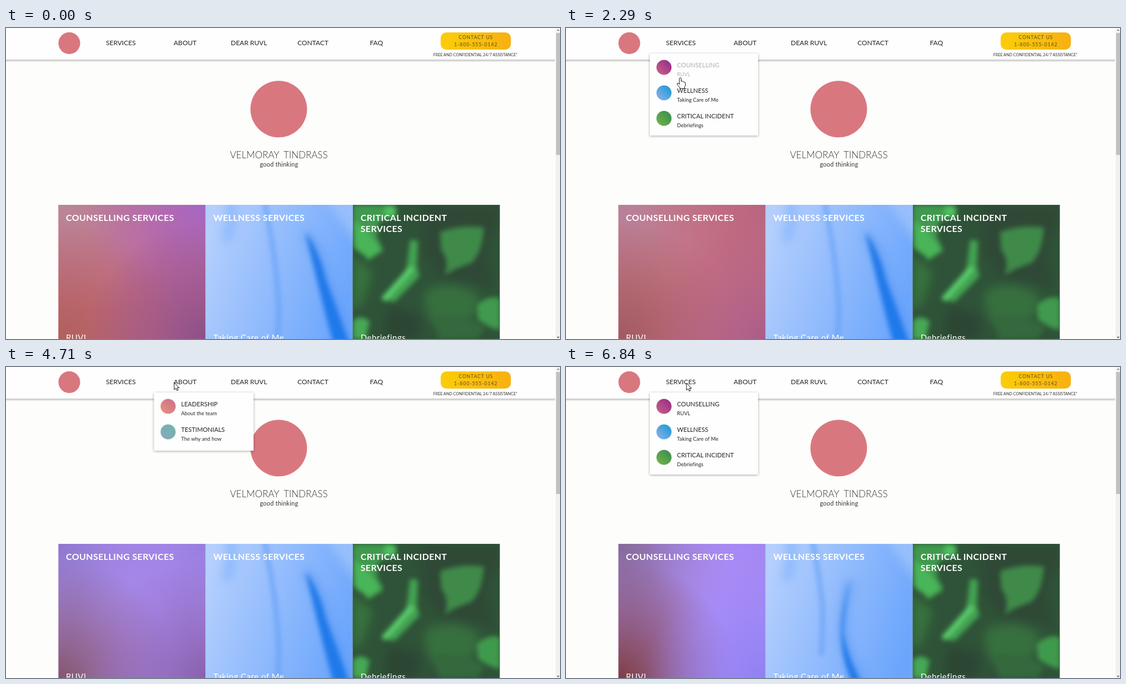
These frames come from a looping animation (998x561 px, 6890 ms). An HTML page:

```html
<!DOCTYPE html>
<html lang="en">
<head>
<meta charset="utf-8">
<title>Services page</title>
<style>
html, body { margin: 0; width: 100%; height: 100%; overflow: hidden; background: #fdfdfc; }
#stage { display: block; width: 998px; height: 561px; font-family: Lato, "Open Sans", sans-serif; }
.panel { filter: drop-shadow(0 1px 2px rgba(0,0,0,.35)); }
.soft { filter: blur(4px); }
.softer { filter: blur(9px); }
</style>
</head>
<body>
<svg id="stage" viewBox="0 0 998 561"></svg>
<script>
const LOOP = 6890;
const stage = document.getElementById('stage');
const $ = id => document.getElementById(id);

const text = (x, y, size, str, attrs = '') =>
  `<text x="${x}" y="${y}" font-size="${size}" ${attrs}>${str}</text>`;

const linear = (id, a, b, dir = 'x1="0" y1="1" x2="1" y2="0"') =>
  `<linearGradient id="${id}" ${dir}><stop stop-color="${a}"/><stop offset="1" stop-color="${b}"/></linearGradient>`;

const card = (x, body) =>
  `<svg x="${x}" y="319" width="265" height="242" viewBox="${x} 319 265 242">${body}</svg>`;

const cardText = (x, lines, sub) =>
  lines.map((s, i) => text(x, 347.7 + i * 20.5, 16, s, 'font-weight="700" letter-spacing=".4"')).join('') +
  text(x, 564, 15, sub, 'letter-spacing=".5"');

function menu(id, x, w, h, items) {
  const rows = items.map(([title, sub, fill], i) => {
    const y = 71 + i * 46;
    return `<circle cx="${x + 25.5}" cy="${y}" r="13.6" fill="url(#${fill})"/>
      <g id="${fill}Row">${text(x + 49, y + .2, 11.1, title)}${text(x + 49, y + 15.6, 9.2, sub, 'letter-spacing=".1"')}</g>`;
  }).join('');
  return `<g id="${id}"><rect class="panel" x="${x}" y="46" width="${w}" height="${h}" fill="#fefefe"/>${rows}</g>`;
}

// Card 1: four corner glows over a centre colour
const corners = [[94.5, 319], [359.5, 319], [94.5, 561], [359.5, 561]];
const glowDefs = corners.map((c, i) =>
  `<radialGradient id="glow${i}"><stop class="tone${i}"/><stop class="tone${i}" offset=".4" stop-opacity=".62"/><stop class="tone${i}" offset="1" stop-opacity="0"/></radialGradient>`).join('');
const glows = corners.map(([x, y], i) =>
  `<circle cx="${x}" cy="${y}" r="215" fill="url(#glow${i})"/>`).join('');

const leaves = `
  <rect x="624" y="319" width="266" height="242" fill="#2f5338"/>
  <g class="softer">
    <path d="M750 319H890V350L862 400 880 470 840 460 780 450 750 400Z" fill="#2f4936"/>
    <path d="M755 475Q800 450 850 480Q860 530 800 545Q750 540 755 475Z" fill="#37703f"/>
    <path d="M625 410L660 440 640 500 625 510Z" fill="#38743f"/>
    <path d="M690 500L750 520 740 561H680Z" fill="#2c4634"/>
  </g>
  <g class="soft">
    <path d="M625 319H700L704 338 672 350 668 375 680 402 652 420 638 400 625 395Z" fill="#40994e"/>
    <path d="M625 345L655 372 676 400 655 415 630 400Z" fill="#49b558"/>
    <path d="M684 319L704 324 700 342 680 338Z" fill="#4fbf60"/>
    <path d="M782 368Q820 354 861 360Q858 405 838 424Q812 432 790 446Q800 420 784 400Z" fill="#3f8a49"/>
    <path d="M728 382L742 384 740 430 745 448 700 494 676 490 712 452 722 432Z" fill="#43a352"/>
    <path d="M732 432L680 490" stroke="#5bd06d" stroke-width="10" fill="none"/>
    <path d="M848 500Q870 480 890 488V545Q868 540 850 526Z" fill="#409a4d"/>
    <path d="M625 528Q640 515 655 530L648 561H625Z" fill="#46a854"/>
    <path d="M770 520Q820 512 862 540L850 561H780Z" fill="#34683d"/>
  </g>`;

stage.innerHTML = `
<defs>
  ${linear('plum', '#cc6484', '#91288c')}
  ${linear('azure', '#93b4e6', '#1295d8')}
  ${linear('fern', '#72b944', '#398654')}
  ${linear('coral', '#f0907c', '#c4708a')}
  ${linear('teal', '#86a9c4', '#72b4a6')}
  ${linear('gold', '#fbcd08', '#f8b010', '')}
  ${linear('sky', '#b4cffd', '#6ca6fc', 'x1="0" y1=".3" x2="1" y2=".6"')}
  ${linear('shade', '#000', '#000', 'x1="0" y1="0" x2="0" y2="1"').replace('stop-color="#000"/>', 'stop-color="#000" stop-opacity=".24"/>').replace('offset="1" stop-color="#000"', 'offset="1" stop-color="#000" stop-opacity="0"')}
  ${glowDefs}
</defs>
<rect width="998" height="561" fill="#fdfdfc"/>
<rect y="57" width="989" height="5" fill="url(#shade)"/>
<rect width="989" height="57" fill="#fefefe"/>
<circle cx="114" cy="27.3" r="19.6" fill="#d9777f"/>
<circle cx="491.3" cy="146.3" r="51" fill="#d9777f"/>
<g fill="#222">
  ${[[180, 'SERVICES'], [302, 'ABOUT'], [405, 'DEAR RUVL'], [525, 'CONTACT'], [655.5, 'FAQ']]
    .map(([x, s]) => text(x, 30.8, 12, s)).join('')}
</g>
<rect x="783" y="8" width="126.5" height="31" rx="10" fill="url(#gold)"/>
<g text-anchor="middle" fill="#5a4a1c">
  ${text(846.5, 19.5, 8.5, 'CONTACT US', 'letter-spacing=".95"')}
  ${text(846.5, 33, 8.5, '1-800-555-0142', 'letter-spacing="1.05"')}
  ${text(845.5, 50.6, 7.2, 'FREE AND CONFIDENTIAL 24/7 ASSISTANCE*', 'fill="#333"')}
  ${text(491.5, 234.6, 17, 'VELMORAY TINDRASS', 'fill="#333" font-weight="300" word-spacing="4"')}
  ${text(491.8, 250.4, 11, 'good thinking', 'fill="#333" letter-spacing=".25"')}
</g>
${card(94.5, `<rect id="centre" x="94" y="319" width="266" height="242"/>${glows}`)}
${card(359.5, `
  <rect x="359" y="319" width="266" height="242" fill="url(#sky)"/>
  <g class="softer">
    <path d="M403 305Q412 340 396 385" stroke="#80b2fa" stroke-width="15" fill="none" opacity=".8"/>
    <path d="M570 300H640V400Z" fill="#a4c6fb" opacity=".7"/>
    <path id="ridge" fill="none" stroke="#4d92f4" stroke-width="16" opacity=".5"/>
  </g>
  <g class="soft">
    <path id="crease" fill="none" stroke="#5c9bf5" stroke-width="8" opacity=".65"/>
    <path id="fold" fill="#2079ea"/>
  </g>`)}
${card(624.5, leaves)}
<g fill="#fff">
  ${cardText(108, ['COUNSELLING SERVICES'], 'RUVL')}
  ${cardText(373.5, ['WELLNESS SERVICES'], 'Taking Care of Me')}
  ${cardText(638.7, ['CRITICAL INCIDENT', 'SERVICES'], 'Debriefings')}
</g>
<g fill="#222">
  ${menu('services', 151, 195, 148, [
    ['COUNSELLING', 'RUVL', 'plum'],
    ['WELLNESS', 'Taking Care of Me', 'azure'],
    ['CRITICAL INCIDENT', 'Debriefings', 'fern']])}
  ${menu('about', 266.5, 179.5, 105, [
    ['LEADERSHIP', 'About the team', 'coral'],
    ['TESTIMONIALS', 'The why and how', 'teal']])}
</g>
<g id="status">
  <path class="panel" d="M-4 552H326Q329 552 329 555V566H-4Z" fill="#fff"/>
  ${text(-4, 563, 9.2, 'https://velmoray-tindrass.example/care.html', 'fill="#555"')}
</g>
<rect x="990" width="8" height="561" fill="#f1f1f1"/>
<rect x="991" y="9" width="7" height="220" fill="#c1c1c1"/>
<path d="M992.5 5L994.7 2.5 997 5Z" fill="#777"/>
<path d="M992.5 557L994.7 559.5 997 557Z" fill="#444"/>
<g id="cursor" fill="#fff" stroke="#111" stroke-linejoin="round">
  <path id="arrow" d="M0 0V13L3 10.2 5 14.6 7.2 13.6 5.2 9.4H9Z"/>
  <path id="hand" d="M-1.7 1.5Q0-1.2 1.7 1.5V7Q3.4 5.6 4.4 7.6Q6 6.6 7 8.6Q9 8 9.2 10.5V14Q8.6 16.5 7.6 17.5V20H-1V18Q-3.6 15.6-6 11.6Q-5.4 8.8-3 11L-1.7 12.5Z"/>
</g>`;

// time, then colours: centre, top left, top right, bottom left, bottom right
const tones = [
  [0, 'cb6d8c b78798 a566c4 b0605a 8c5088'],
  [1630, 'd07280 b37a7a c06a82 a0504c b4607f'],
  [2880, 'd27a82 b687b8 b0607e a06274 a25a92'],
  [3840, 'b898fb a688ee ae90f4 8c608e 9a80f2'],
  [4710, 'b694fb 8f78cc 987ede 85566c 8860ac'],
  [5500, 'ba93ef 8f70be 9c76c0 805a84 80609a'],
  [6840, 'b695fd 866898 a286f2 7e3e42 9080f2']
].map(([t, s]) => [t, ...s.match(/\w\w/g).map(h => parseInt(h, 16))]);

const route = [
  [800, 96, 150], [1450, 188, 36], [1630, 190, 34], [1950, 203, 68], [2250, 206, 84],
  [2550, 205, 122], [2880, 204, 162], [3300, 208, 166], [3600, 212, 135], [3840, 215, 83],
  [4150, 220, 60], [4350, 240, 38], [4710, 303, 28], [5050, 310, 29], [5500, 277, 28],
  [5850, 225, 29], [6840, 217, 29]
];

const creaseFrom = [465, 310, 484, 400, 489, 470, 494, 520, 488, 570];
const creaseTo = [443, 310, 454, 360, 461, 420, 464, 450, 460, 520];
const foldFrom = [540, 370, 564, 400, 577, 455, 594, 500, 619, 570, 590, 570, 568, 490, 540, 370];
const foldTo = [512, 385, 500, 440, 500, 480, 506, 520, 533, 570, 516, 570, 478, 490, 512, 385];

const mix = (a, b, k) => a.map((v, i) => v + (b[i] - v) * k);
const clamp = v => Math.max(0, Math.min(1, v));
const within = (t, a, b) => t >= a && t < b;

function sample(keys, t) {
  let i = 0;
  while (i < keys.length - 2 && t >= keys[i + 1][0]) i++;
  const [a, b] = [keys[i], keys[i + 1]];
  return mix(a, b, clamp((t - a[0]) / (b[0] - a[0]))).slice(1);
}

const show = (id, on) => $(id).setAttribute('display', on ? 'inline' : 'none');
const fade = (t, spans) => 1 - .65 * Math.max(...spans.map(([a, b]) =>
  clamp(Math.min((t - a) / 90, (b - t) / 90))));

function draw(t) {
  const c = sample(tones, t);
  const rgb = i => `rgb(${c.slice(i * 3, i * 3 + 3).map(Math.round)})`;
  $('centre').setAttribute('fill', rgb(0));
  for (let i = 0; i < 4; i++)
    for (const stop of document.querySelectorAll('.tone' + i)) stop.setAttribute('stop-color', rgb(i + 1));

  const k = clamp((t - 5800) / 1040);
  const p = mix(creaseFrom, creaseTo, k);
  const f = mix(foldFrom, foldTo, k);
  $('crease').setAttribute('d', `M${p.slice(0, 2)}Q${p.slice(2, 6)}Q${p.slice(6)}`);
  $('fold').setAttribute('d', `M${f.slice(0, 2)}Q${f.slice(2, 6)}Q${f.slice(6, 10)}L${f.slice(10, 12)}Q${f.slice(12)}Z`);
  $('ridge').setAttribute('d', `M${f.slice(0, 2)}Q${f.slice(2, 6)}Q${f.slice(6, 10)}`);

  show('services', within(t, 1420, 4400) || t >= 5750);
  show('about', within(t, 4480, 5750));
  show('status', within(t, 3050, 4300));
  $('plumRow').setAttribute('opacity', fade(t, [[1960, 2400], [3880, 4250]]));
  $('azureRow').setAttribute('opacity', fade(t, [[2400, 2985], [3560, 3980]]));
  $('fernRow').setAttribute('opacity', fade(t, [[2900, 3620]]));

  const [x, y] = sample(route, t);
  const pointing = within(t, 1950, 4200);
  show('cursor', t >= 800);
  show('hand', pointing);
  show('arrow', !pointing);
  $('cursor').setAttribute('transform', `translate(${x.toFixed(1)} ${y.toFixed(1)})`);
}

function tick() {
  draw(performance.now() % LOOP);
  requestAnimationFrame(tick);
}
tick();
</script>
</body>
</html>
```
